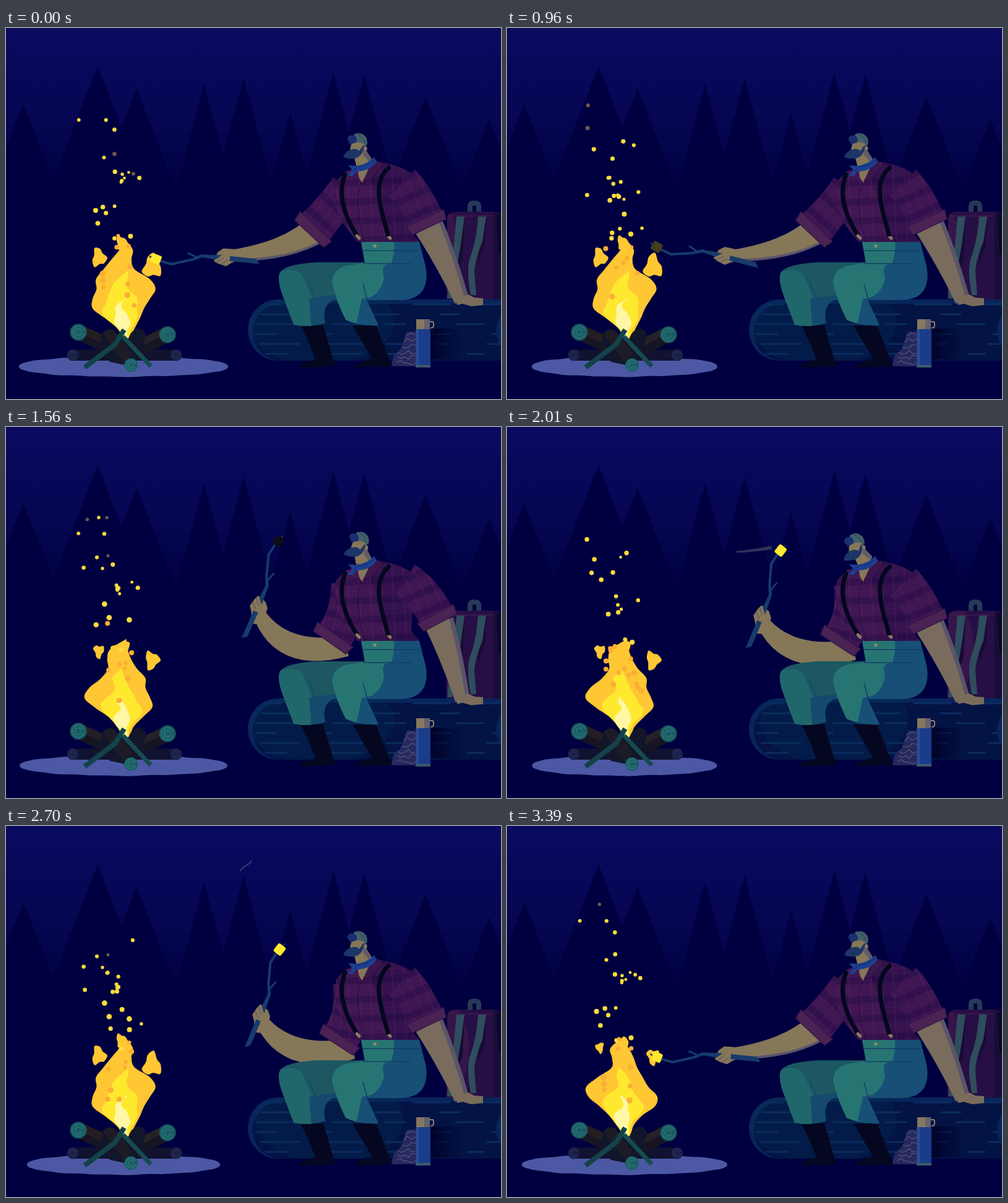
Write an HTML page with a canvas that moves like this. It is 800 px wide and 600 px high and loops after 3.42 s.

```html
<!DOCTYPE html>
<html lang="en">
<head>
<meta charset="utf-8">
<title>Campfire</title>
<style>
  html, body { margin: 0; width: 100%; height: 100%; overflow: hidden; background: #000040; }
  canvas { display: block; width: 800px; height: 600px; }
</style>
</head>
<body>
<canvas id="stage" width="800" height="600"></canvas>
<script>
const ctx = document.getElementById('stage').getContext('2d');
const LOOP = 3420, TAU = Math.PI * 2, { sin, cos, PI } = Math;
const NIGHT = '#000040', TAN = '#857758', SHADE = '#5b556a', DARK = '#04071f';

// --- helpers ---
const mix = (a, b, k) => a + (b - a) * k;
const morph = (a, b, k) => a.map((p, i) => [mix(p[0], b[i][0], k), mix(p[1], b[i][1], k)]);
function ramp(t, from, to) {
  const k = Math.min(1, Math.max(0, (t - from) / (to - from)));
  return k * k * (3 - 2 * k);
}
const pulse = (t, a, b, c, d) => ramp(t, a, b) - ramp(t, c, d);
function random(seed) {
  return () => (seed = (seed * 16807) % 2147483647) / 2147483647;
}

function poly(p) {
  const path = new Path2D();
  p.forEach(([x, y]) => path.lineTo(x, y));
  path.closePath();
  return path;
}

function blob(p) {
  const path = new Path2D(), n = p.length, at = i => p[(i + n) % n];
  path.moveTo(...p[0]);
  for (let i = 0; i < n; i++) {
    const [a, b, c, d] = [at(i - 1), at(i), at(i + 1), at(i + 2)];
    path.bezierCurveTo(b[0] + (c[0] - a[0]) / 6, b[1] + (c[1] - a[1]) / 6,
      c[0] - (d[0] - b[0]) / 6, c[1] - (d[1] - b[1]) / 6, c[0], c[1]);
  }
  return path;
}

// Tapered tube along a quadratic curve a-c-b.
function limb([a, c, b], w0, w1, bulge = 0) {
  const left = [], right = [];
  for (let i = 0; i <= 14; i++) {
    const s = i / 14, r = 1 - s;
    const [x, y] = [0, 1].map(j => r * r * a[j] + 2 * r * s * c[j] + s * s * b[j]);
    const [dx, dy] = [0, 1].map(j => r * (c[j] - a[j]) + s * (b[j] - c[j]));
    const h = (mix(w0, w1, s) + bulge * sin(PI * s)) / 2 / Math.hypot(dx, dy);
    left.push([x - dy * h, y + dx * h]);
    right.unshift([x + dy * h, y - dx * h]);
  }
  return poly([...left, ...right]);
}

const toPath = d => typeof d === 'string' ? new Path2D(d) : d;
function fill(color, d) { ctx.fillStyle = color; ctx.fill(toPath(d)); }
function line(color, width, d, cap = 'round') {
  ctx.strokeStyle = color; ctx.lineWidth = width;
  ctx.lineCap = cap; ctx.lineJoin = 'round';
  ctx.stroke(toPath(d));
}
function disc(color, x, y, r, ry = r) {
  ctx.fillStyle = color;
  ctx.beginPath(); ctx.ellipse(x, y, r, ry, 0, 0, TAU); ctx.fill();
}
function inside(path, draw) { ctx.save(); ctx.clip(toPath(path)); draw(); ctx.restore(); }
function moved(x, y, deg, draw) {
  ctx.save(); ctx.translate(x, y); ctx.rotate(deg * PI / 180); draw(); ctx.restore();
}

// --- scenery ---
const sky = ctx.createLinearGradient(0, 0, 0, 265);
[[0, '#0a0a60'], [.4, '#070757'], [.7, '#05054e'], [1, NIGHT]].forEach(s => sky.addColorStop(...s));
const WIDE = [[28, 123], [148, 62], [211, 98], [678, 110], [781, 147]];
const SLIM = [[320, 90], [384, 80], [459, 136], [529, 72], [579, 75]];

function drawSky() {
  fill(NIGHT, 'M0 0H800V600H0Z');
  fill(sky, 'M0 0H800V265H0Z');
  const tree = slope => ([x, y]) => {
    const w = (265 - y) * slope;
    fill(NIGHT, poly([[x, y], [x + w, 265], [x - w, 265]]));
  };
  WIDE.forEach(tree(.39));
  SLIM.forEach(tree(.262));
}

function drawPool(w) {
  const p = [];
  for (let a = 0; a < TAU; a += TAU / 80) {
    const r = 1 + .02 * sin(9 * a) + .025 * sin(17 * a + 1);
    p.push([190 + w * cos(a), 547.5 + 16.5 * r * Math.sign(sin(a)) * Math.abs(sin(a)) ** .85]);
  }
  fill('#4c58a4', blob(p));
}

const LOG = 'M440 439H820V538H440A49 49.5 0 0 1 440 439Z';
function drawLog(edge) {
  fill('#08245a', LOG);
  fill('#021344', 'M444 446H820V538H444A45 46 0 0 1 444 446Z');
  inside(LOG, () => disc('rgba(6,54,84,.24)', edge - 120, 474, 120, 72));
  const rnd = random(77);
  for (let y = 447; y < 530; y += 16) {
    const inset = Math.abs(y - 488) * .5;
    for (let x = 400 + inset, len; x < 800; x += len + 20 + rnd() * 70) {
      len = 25 + rnd() * 55;
      line('#0b2c5e', 3, `M${x} ${y}h${len}`);
    }
  }
  disc('#08245a', 818, 490, 26, 34);
  const shadow = ctx.createLinearGradient(686, 0, 738, 0);
  shadow.addColorStop(0, 'rgba(0,0,38,.9)');
  shadow.addColorStop(1, 'rgba(0,0,38,0)');
  fill(shadow, 'M686 486H738V536H686Z');
}

function drawPack(edge) {
  const body = 'M713 308Q714 297 727 297H790Q800 297 800 306V439H712Z';
  line('#253a57', 8, 'M750 298V288Q750 283 757 283Q764 283 764 288V298', 'butt');
  fill('#260f45', body);
  inside(body, () => {
    disc('#36154a', edge + 38, 360, 68, 96);
    fill('#190c38', 'M788 297H800V439H788Z');
    fill('#07082a', 'M793 302H800V366H796Z');
  });
  line('#451a50', 1.5, 'M718 304H786');
  fill('#170b35', 'M741 305L738 372L728 398L733 350ZM776 305L774 350L762 384L766 340Z');
  fill('#2f4d5c', 'M728 305H741L735 350Q726 400 721 437H713Q717 390 724 350Z');
  fill('#2f4d5c', 'M763 305H776L770 345Q757 378 757 395L760 432H751Q744 394 749 374Q760 346 763 305Z');
}

function drawThermos() {
  const bag = 'M648 491H662V547H622L627 529Q641 520 643 505Z';
  fill('#26295f', bag);
  inside(bag, () => {
    const rnd = random(9);
    for (let y = 496; y < 545; y += 9) {
      let d = `M${628 + rnd() * 6} ${y}`;
      for (let x = 636; x < 662; x += 6) d += `L${x + rnd() * 3} ${y - 4 + rnd() * 9}`;
      line('#57566f', 1.2, d);
    }
  });
  line('#8a7f70', 2, 'M685 475H689Q691 475 691 479V481Q691 485 687 485');
  fill('#1b3c8a', 'M662 487H686V546H662Z');
  fill('#284f94', 'M663 487H667V546H663Z');
  fill('#857860', 'M663 471H685V487H663Z');
  fill('#676071', 'M676 471H685V487H676Z');
  fill('#3d5b6c', 'M662 545H686V549H662Z');
}

// --- fire ---
// Half widths at even steps from the embers to the tip.
const PROFILE = [5, 14, 27, 43, 51, 49, 40, 23, 17, 13, 1];

function flame(phase, scale, height) {
  const left = [], right = [];
  PROFILE.forEach((half, i) => {
    const v = i / (PROFILE.length - 1);
    const x = 195 - 6 * v - 6 * sin(PI * v) + 8 * v * sin(9 * v - phase);
    const edge = side => x + side * half * scale * (1 + (.12 + .3 * v) * sin(12 * v - phase + side * 1.2));
    left.push([edge(-1), 501 - height * v]);
    right.unshift([edge(1), 497 - height * (v - .02)]);
  });
  return blob([...left, ...right]);
}

// Scraps of flame that tear off, shrink and rise.
function scrap(x, y, u, seed) {
  const p = [];
  for (let a = 0; a < TAU; a += TAU / 9) {
    const r = 14 * (1 - .65 * u) * (1 + .3 * sin(3 * a + seed));
    p.push([x + r * cos(a), y - 26 * u + 1.3 * r * sin(a)]);
  }
  return blob(p);
}

function drawFlame(t) {
  const step = Math.floor(t % 450 / 75), phase = step / 6 * TAU;
  fill('#ffc733', flame(phase, 1, 157));
  [[236, 386], [150, 380], [186, 364]].forEach(([x, y], i) =>
    fill('#ffc733', scrap(x, y, (step + i * 2) % 6 / 6, step + i)));
  fill('#ffe92f', flame(phase + 1, .58, 108));
  fill('#fff7a6', flame(phase + 2, .24, 62));
}

function stump(x, y, r, rim, ring) {
  disc(rim, x, y, r);
  for (const k of [.72, .4]) {
    ctx.strokeStyle = ring; ctx.lineWidth = 1.5;
    ctx.beginPath(); ctx.arc(x, y, r * k, .3, 5.9); ctx.stroke();
  }
}

function drawWood() {
  line('#10122f', 18, 'M112 529H272');
  for (const x of [108, 275]) stump(x, 529, 9.5, '#181e46', '#252c54');
  line('#241e22', 25, 'M120 493L192 526', 'butt');
  line('#151524', 12, 'M118 499L190 534', 'butt');
  line('#151524', 25, 'M258 497L196 529', 'butt');
  line('#262126', 11, 'M254 491L204 516', 'butt');
  fill('#12162a', 'M154 500Q158 486 170 487L186 500L197 506Q201 488 214 486Q226 487 226 499L218 528L192 545L168 540L152 518Z');
  fill('#1d1c26', 'M156 494Q166 484 176 490L204 528L190 540Z');
  line('#134349', 8, 'M127 549L176 512L191 488', 'butt');
  line('#154b51', 7, 'M234 547L189 499', 'butt');
  for (const [x, y, r] of [[117, 492, 13.5], [261, 496, 13.5], [202, 545, 11]])
    stump(x, y, r, '#1b5c62', '#27787a');
}

const rnd = random(4711);
const SPARKS = Array.from({ length: 30 }, () => ({
  phase: rnd(), x: 158 + rnd() * 62, drift: rnd() * 90 - 65, rise: 210 + rnd() * 125,
  size: 2.7 + rnd() * 1.8, sway: rnd() * TAU, rate: rnd() < .5 ? 2 : 3
}));
function drawSparks(t) {
  for (const s of SPARKS) {
    const u = (s.phase + t * s.rate / LOOP) % 1;
    const x = s.x + s.drift * u + 9 * sin(s.sway + u * 8);
    const color = u > .97 ? '#6d5a4c' : u < .35 ? '#faae35' : '#ffdc3c';
    disc(color, x, 450 - s.rise * u ** .85, s.size * (1.15 - .35 * u));
  }
}

// --- camper ---
// Each limb: start, bend, end. Poses: reaching, raised, leaning back.
const SLEEVE = [[[550, 254], [531, 289], [498, 324]], [[553, 252], [563, 308], [540, 343]],
  [[551, 252], [552, 308], [530, 339]]];
const FOREARM = [[[496, 330], [447, 362], [366, 368]], [[560, 360], [452, 386], [409, 308]],
  [[550, 354], [445, 378], [407, 298]]];
const PROP_SLEEVE = [[[640, 251], [660, 270], [679, 311]], [[645, 248], [675, 267], [696, 306]]];
const PROP_ARM = [[[684, 322], [714, 380], [737, 442]], [[700, 316], [722, 376], [738, 442]]];

function plaid(path, deg, x, y) {
  inside(path, () => moved(x, y, deg, () => {
    for (let i = -5; i < 6; i++) {
      line('rgba(20,6,62,.28)', 11, `M-140 ${i * 31}H140`, 'butt');
      line('rgba(150,62,125,.12)', 1, `M-140 ${i * 31 + 15}H140`);
      line('rgba(150,62,125,.2)', 1.3, `M${i * 18} -150V150`);
    }
  }));
}

function drawSleeve(bones, w0, w1, tilt) {
  const [, c, b] = bones, path = limb(bones, w0, w1);
  fill('#3d1652', path);
  plaid(path, tilt, ...c);
  const d = Math.hypot(b[0] - c[0], b[1] - c[1]);
  const along = k => [b[0] + (b[0] - c[0]) / d * k, b[1] + (b[1] - c[1]) / d * k];
  const cuff = limb([along(-4), along(4), along(12)], w1 + 8, w1 + 2);
  fill('#4a2253', cuff);
  line('#34134a', 1.2, cuff);
}

function drawSkin(path, lit, dx, dy) {
  fill(SHADE, path);
  inside(path, () => moved(dx, dy, 0, () => fill(lit, path)));
}

const YELLOW = [255, 233, 46], BURNT = [13, 14, 26];
const STICK = 'M2 4L-2 -5L-58 -20L-89 -26L-104 -22L-138 -20L-156 -28L-173 -38L-171 -34L-156 -24L-139 -16L-104 -18L-88 -21L-60 -12Z';
const HAND = 'M-70 -12L-62 -25L-52 -30L-42 -28L-24 -23L-24 -9L-42 -5L-52 -1L-64 -7Z';
const FINGERS = 'M-69 -13L-53 -21L-43 -16L-45 -8L-52 -3L-58 -7Z';

function drawStick(burnt) {
  fill('#173b6b', STICK);
  line('#173b6b', 3, 'M-97 -23L-109 -31');
  moved(-162, -30, 30, () => {
    ctx.fillStyle = `rgb(${YELLOW.map((v, i) => Math.round(mix(v, BURNT[i], burnt)))})`;
    ctx.beginPath(); ctx.roundRect(-8, -7.5, 16, 15, 2.5); ctx.fill();
  });
}

function drawArm({ x, y, turn, raise, lean, burnt }) {
  const at = poses => morph(morph(poses[0], poses[1], raise), poses[2], lean);
  drawSkin(limb(at(FOREARM), mix(44, 34, raise), 19, 11 * raise), TAN, 0, -4 * (1 - raise));
  drawSleeve(at(SLEEVE), 50, 62, mix(42, 14, raise));
  moved(x, y, turn, () => {
    fill(TAN, HAND);
    drawStick(burnt);
    fill(TAN, FINGERS);
    line(SHADE, 1.2, 'M-66 -9L-54 -15M-58 -5L-48 -11');
  });
}

function drawLegs() {
  const far = 'M585 379H500Q452 382 443 395Q437 406 448 435L465 480Q490 485 516 477Q509 450 528 440L600 436Z';
  const near = 'M574 346H668L678 385C684 415 674 439 640 440H583L602 481Q574 483 549 472Q533 440 527 412Q527 390 552 384L580 380Z';
  fill(DARK, 'M476 481H513L527 530L533 547L474 549Q475 542 500 536L490 510Z');
  fill(DARK, 'M560 481H598L616 527L624 547L563 549Q565 541 592 535L578 512Z');
  fill('#1c5762', far);
  inside(far, () => {
    fill('#20676c', 'M436 396Q470 384 480 402L500 450L493 490H440Z');
    fill('#154a6c', 'M490 438L540 430V490H494Z');
  });
  line('#15466a', 1.5, 'M489 410L501 440');
  fill('#174f76', near);
  inside(near, () => {
    fill('#277573', 'M560 340H626Q630 360 622 382Q604 380 611 404Q606 432 578 440L572 484H520V380H574Z');
    fill('#174f76', 'M575 438L606 432V490H564Z');
  });
  line('#123f66', 1.5, 'M577 360H668M578 381H655M577 414L584 440');
  disc('#8a8a68', 596, 352.5, 2.8);
}

const TORSO = 'M548 233L575 222L602 216Q640 222 662 240L655 330L668 346H568L545 316Q526 280 534 248Z';
function drawTorso() {
  fill('#34124e', TORSO);
  inside(TORSO, () => fill('#411752', 'M520 220H580L626 346H560L530 300Z'));
  plaid(TORSO, -3, 590, 280);
  line('#2a0f45', 1.5, 'M574 248Q562 290 580 346');
  fill(TAN, 'M566 222L592 214L576 250Q569 244 569 230Z');
  fill('#3b164c', 'M598 214L609 222L590 244L577 246Z');
  line('#280e42', 1.2, 'M609 222L590 244L577 247');
  line(DARK, 7, 'M549 234C534 268 548 306 568 337', 'butt');
  line('#8a7c62', 5, 'M567 336L571 340M617 336L621 340');
}

function drawHead(nod) {
  moved(577, 215, nod, () => {
    ctx.translate(-577, -215);
    fill(TAN, 'M558 188L568 182L580 186L582 198L591 212L585 222L566 222L563 210L555 200Z');
    fill('#625c68', 'M578 188L583 192L582 198L591 212L588 218L577 205Z');
    fill('#436069', 'M562 172Q574 166 582 177Q585 183 583 190L577 187Q569 183 566 186Z');
    line('#2c4560', 1.2, 'M568 171Q577 176 580 186');
    fill('#1a2f70', 'M552 178Q554 172 563 174Q569 178 566 185Q558 188 555 188Q556 184 552 182Z');
    fill('#1d3566', 'M545 209Q547 201 556 197Q566 193 571 199L577 190L579 191Q577 206 567 210Q556 213 545 209Z');
    disc('#857760', 581, 195, 2.6, 3.4);
  });
  fill('#1d3f92', 'M567 223Q584 220 595 209L599 216Q588 232 566 232L560 240L552 238L560 230L553 222Z');
  line('#142c72', 1.2, 'M567 224Q584 225 596 213M562 231L567 226');
}

function drawProp(lean) {
  const at = poses => morph(poses[0], poses[1], lean);
  const lit = '#7a6c5c';
  drawSkin(limb(at(PROP_ARM), 48, 24), lit, -7, 0);
  fill(lit, 'M727 436L747 431L757 436L771 437V448L752 450L738 446L729 448Z');
  drawSleeve(at(PROP_SLEEVE), 60, 58, -24);
  line(DARK, 7, 'M621 224C590 246 605 290 618 337', 'butt');
}

function drawSmoke(t) {
  const blow = (t - 1880) / 330;
  if (blow > 0 && blow < 1) {
    const x = 428 - 40 * (blow - .39), len = 57 * Math.min(1, blow / .39);
    ctx.globalAlpha = Math.min(1, 2.2 * (1 - blow));
    fill('#2f3259', limb([[x, 195], [x - len / 2, 200], [x - len, 202]], 6, 3));
  }
  const u = (t - 2050) / 800;
  if (u > 0 && u < 1) {
    const up = 1 - (1 - u) ** 1.25, h = 8 + 30 * sin(PI * Math.sqrt(u));
    const x = mix(448, 387, up), y = mix(190, 37, up);
    ctx.globalAlpha = Math.min(1, 5 * (1 - u));
    line('#55567c', 1.2 + 2 * (1 - u) ** 2, `M${x - 16} ${y + h}C${x - 13} ${y + h * .45} ${x - 2} ${y + h * .55} ${x + 2} ${y}`);
  }
  ctx.globalAlpha = 1;
}

// --- motion ---
function poseAt(t) {
  const raise = pulse(t, 1160, 1470, 2800, 3220);
  const lean = pulse(t, 1250, 1500, 1560, 1790);
  const dip = 1 - pulse(t, 60, 350, 2900, 3220);
  return {
    raise, lean,
    x: mix(404 + 3 * dip, 390, raise) - 5 * lean,
    y: mix(384 - 6 * dip, 356, raise) - 16 * lean,
    turn: mix(-9 * dip, 98, raise) + lean,
    nod: 5 * lean - 12 * pulse(t, 1790, 1920, 2070, 2250),
    burnt: pulse(t, 500, 1160, 1870, 1960)
  };
}

function draw(t) {
  const pose = poseAt(t), wave = n => cos(TAU * n * t / LOOP);
  const edge = 638 - 11 * wave(11);
  drawSky();
  drawPool(157 + 12 * wave(13));
  drawLog(edge);
  drawPack(edge);
  drawThermos();
  drawFlame(t);
  drawWood();
  drawSparks(t);
  drawArm(pose);
  drawLegs();
  drawTorso();
  drawHead(pose.nod);
  drawProp(pose.lean);
  drawSmoke(t);
}

const start = performance.now();
function tick() {
  const t = (performance.now() - start) % LOOP;
  draw(Math.floor(t / 30) * 30);
  requestAnimationFrame(tick);
}
tick();
</script>
</body>
</html>
```
